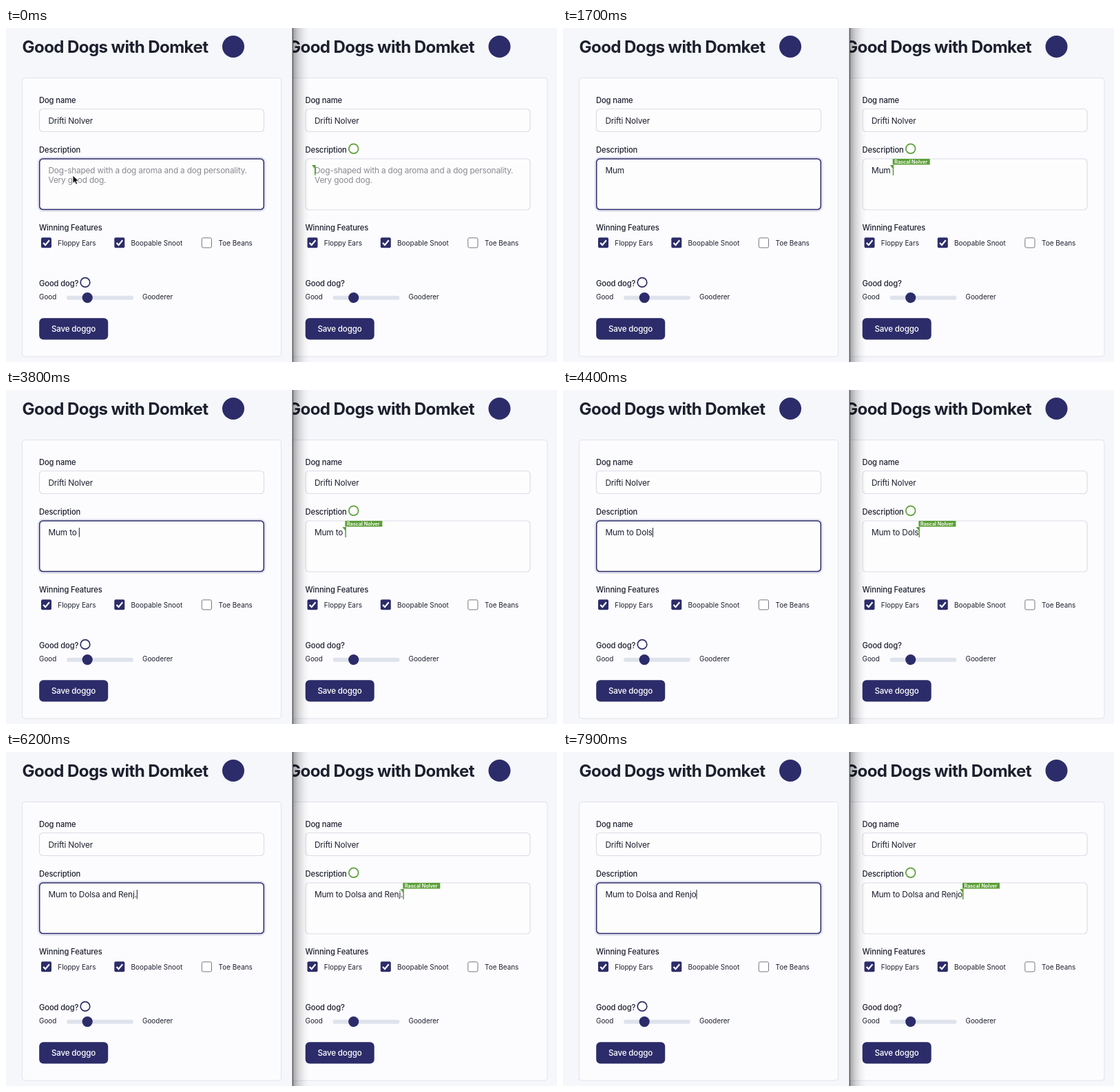
These frames come from a looping animation (800 px wide and 485 px high, 8 s). An HTML page:

```html
<!DOCTYPE html>
<html lang="en">
<head>
<meta charset="utf-8">
<title>Shared form</title>
<style>
  html, body { margin: 0; width: 100%; height: 100%; overflow: hidden; background: #f6f7fb; }
  svg { display: block; width: 800px; height: 485px; font-family: Inter, sans-serif; --navy: #2c2c6a; --green: #5b9f36; }
  text { fill: #1d202e; }
  .title { font-size: 24.1px; font-weight: 700; letter-spacing: -.025em; }
  .label { font-size: 11.2px; font-weight: 550; letter-spacing: -.01em; }
  .value { font-size: 11.85px; letter-spacing: -.015em; }
  .small { font-size: 9.95px; }
  .hint { fill: #898a91; }
  .save { font-size: 11.6px; font-weight: 500; letter-spacing: -.015em; fill: #fff; }
  .tag { font-size: 7.2px; font-weight: 600; fill: #fff; }
  .card { fill: #fcfcfe; stroke: #e1e3ea; }
  .field { fill: #fdfdfe; stroke: #dcdee5; stroke-width: 1.2; }
  .navy { fill: var(--navy); }
  .green { fill: var(--green); }
  .ring { fill: #fdfdfe; stroke-width: 1.7; }
  .tick { fill: none; stroke: #fff; stroke-width: 2.2; }
</style>
</head>
<body>
<svg viewBox="0 0 800 485">
  <defs>
    <linearGradient id="shade">
      <stop offset="0" stop-opacity=".37"/>
      <stop offset=".35" stop-opacity=".16"/>
      <stop offset=".7" stop-opacity=".045"/>
      <stop offset="1" stop-opacity="0"/>
    </linearGradient>
    <g id="checked">
      <rect class="navy" width="15" height="15" rx="2"/>
      <path class="tick" d="M3.2 7.7 6.2 10.8 11.9 4"/>
    </g>
    <g id="page">
      <rect width="416" height="485" fill="#f6f7fb"/>
      <text class="title" x="23.5" y="36.2">Good Dogs with Domket</text>
      <circle class="navy" cx="330" cy="27" r="16"/>
      <rect class="card" x="23.5" y="72.5" width="376" height="404.5" rx="4"/>
      <text class="label" x="48" y="108.5">Dog name</text>
      <rect class="field" x="48.5" y="117.5" width="326" height="33" rx="5"/>
      <text class="value" x="61.5" y="138.7">Drifti Nolver</text>
      <text class="label" x="48" y="181">Description</text>
      <rect class="field" x="48.5" y="190" width="326" height="74" rx="5"/>
      <text class="label" x="48" y="294">Winning Features</text>
      <use href="#checked" x="51" y="304.3"/>
      <text class="small" x="75.3" y="315.7">Floppy Ears</text>
      <use href="#checked" x="157.3" y="304.3"/>
      <text class="small" x="181.6" y="315.7">Boopable Snoot</text>
      <rect x="284.3" y="304.8" width="14.2" height="14.2" rx="2" fill="#fff" stroke="#77787d"/>
      <text class="small" x="308.6" y="315.7">Toe Beans</text>
      <text class="label" x="48" y="375">Good dog?</text>
      <text class="small" x="48" y="394">Good</text>
      <rect x="88" y="388.7" width="97" height="6" rx="3" fill="#dfe3ec"/>
      <circle class="navy" cx="118.2" cy="391.6" r="7.6"/>
      <text class="small" x="198" y="394">Gooderer</text>
      <rect class="navy" x="48.2" y="421.2" width="100" height="31.4" rx="6"/>
      <text class="save" x="66" y="440.7">Save doggo</text>
    </g>
    <g id="hint">
      <text class="value hint" x="61.5" y="211">Dog-shaped with a dog aroma and a dog personality.</text>
      <text class="value hint" x="61.5" y="224.6">Very good dog.</text>
    </g>
    <text id="typed" class="value" x="61.5" y="211"></text>
  </defs>

  <g transform="translate(386.5)">
    <use href="#page"/>
    <circle class="ring" cx="118.2" cy="175.3" r="6.9" stroke="var(--green)"/>
    <use href="#hint" class="placeholder"/>
    <use href="#typed"/>
    <g id="remote">
      <path class="green" d="M-4 199H1.5V214H0V204Z"/>
      <g id="tag">
        <rect class="green" x="0" y="190" width="54" height="8.5"/>
        <text class="tag" x="2.6" y="197">Rascal Nolver</text>
      </g>
    </g>
  </g>
  <rect x="416" width="24" height="485" fill="url(#shade)"/>

  <use href="#page"/>
  <rect x="46.8" y="188.3" width="329.4" height="77.4" rx="7" fill="none" stroke="#e2e3f0" stroke-width="2.6"/>
  <rect x="48.7" y="190" width="325.6" height="73.6" rx="5" fill="#fdfdfe" stroke="var(--navy)" stroke-width="1.5"/>
  <circle class="ring" cx="115" cy="369.4" r="6.8" stroke="var(--navy)"/>
  <use href="#hint" class="placeholder"/>
  <use href="#typed"/>
  <rect id="caret" y="200" width="1" height="13.5" fill="#1d202e"/>
  <path id="pointer" d="M97 214V225.6L99.8 223 101.7 227.3 103.9 226.3 102 222.2H105.8Z" fill="#111" stroke="#fff" stroke-width=".9"/>
  <rect x="415.6" width="1.3" height="485" fill="#4b4c50"/>
</svg>
<script>
  const LOOP = 8000, BLINK = 500, LEFT = 61.5, FONT_SIZE = 11.85, TRACKING = -.015;
  const $ = id => document.getElementById(id);
  const show = (el, on) => { el.style.display = on ? '' : 'none'; };
  const placeholders = document.querySelectorAll('.placeholder');
  const ruler = document.createElement('canvas').getContext('2d');

  // Each run is a start text, the letters added and the time of each letter.
  const runs = [
    ['', 'Mum ', [300, 400, 500, 700]],
    ['Mum ', 'to ', [3100, 3200, 3400]],
    ['Mum to ', 'Dolsa and ', [3900, 4000, 4100, 4300, 4600, 4700, 4800, 4900, 5000, 5200]],
    ['Mum to Dolsa and ', 'Renj.', [5600, 5700, 5800, 5900, 6100]]
  ];
  const edits = [
    { at: -500, text: '' },
    { at: 1100, text: 'Mum ' },
    { at: 7650, text: 'Mum to Dolsa and Renj' },
    { at: 7800, text: 'Mum to Dolsa and Renjo' }
  ];
  for (const [before, added, times] of runs) {
    times.forEach((at, i) => edits.push({ at, text: before + added.slice(0, i + 1) }));
  }
  edits.sort((a, b) => a.at - b.at);

  function caretX(text) {
    ruler.font = `${FONT_SIZE}px Inter, sans-serif`;
    return LEFT + ruler.measureText(text).width + text.length * FONT_SIZE * TRACKING;
  }

  function draw(now) {
    const t = now % LOOP;
    const edit = edits.filter(e => e.at <= t).pop();
    const text = edit.text.replace(/ /g, '\u00a0');
    if ($('typed').textContent !== text) $('typed').textContent = text;

    const started = text !== '';
    const x = caretX(text);
    placeholders.forEach(p => show(p, !started));
    show($('pointer'), !started);
    show($('tag'), started);
    show($('caret'), started && Math.floor((t - edit.at) / BLINK) % 2 === 0);
    $('caret').setAttribute('x', x);
    $('remote').setAttribute('transform', `translate(${x})`);
    requestAnimationFrame(draw);
  }
  draw(0);
</script>
</body>
</html>
```
